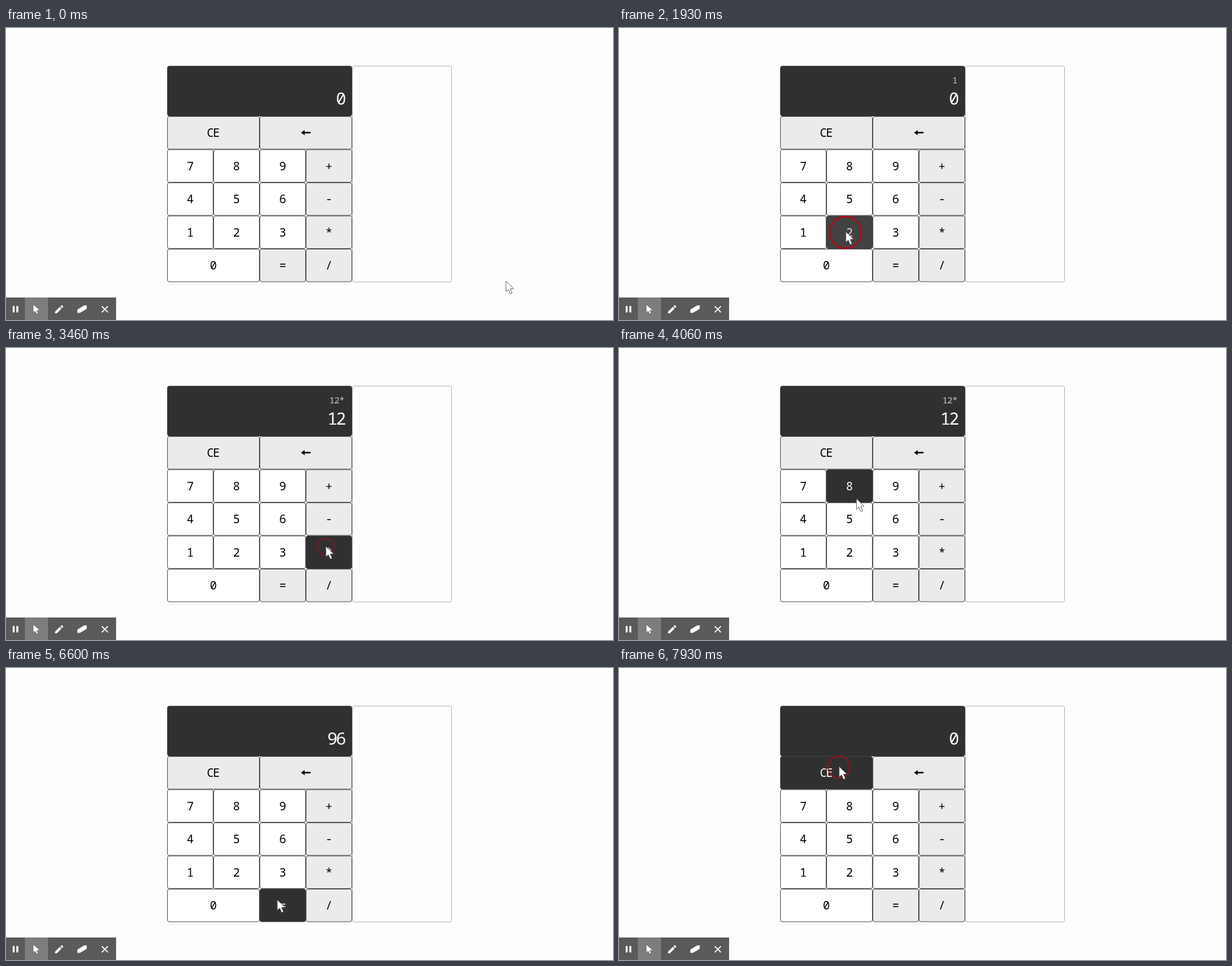
Write an HTML page that moves like this. It is 998 px wide and 480 px high and loops after 8000 ms.

```html
<!DOCTYPE html>
<html lang="en">
<head>
<meta charset="utf-8">
<title>Calculator</title>
<style>
  html, body { margin: 0; width: 100%; height: 100%; overflow: hidden; background: #fdfdfd; }
  svg { display: block; width: 998px; height: 480px; }
  text { font-family: "Noto Sans Mono", "DejaVu Sans Mono", monospace; }
  .key rect { stroke: #2c2c2c; stroke-width: .85; }
  .key text { font-size: 19px; letter-spacing: -1.4px; text-anchor: middle; }
  .out { text-anchor: end; }
  #expr { font-size: 15px; letter-spacing: -.8px; fill: #c6c6c6; }
  #total { font-size: 28px; letter-spacing: -2.6px; fill: #fff; }
</style>
</head>
<body>
<svg viewBox="0 0 998 480">
  <rect width="998" height="480" fill="#fdfdfd"/>
  <rect x="569.5" y="62.5" width="163" height="355" rx="3" fill="#fdfdfd" stroke="#aaa" stroke-width=".9"/>
  <rect x="265" y="62.3" width="304" height="82.8" rx="4" fill="#303030"/>
  <text id="expr" class="out" x="556" y="91"></text>
  <text id="total" class="out" x="556.6" y="126"></text>
  <g id="keys"></g>

  <g id="toolbar">
    <rect y="443" width="181" height="37" fill="#5a5a5a"/>
    <rect x="31" y="443" width="38" height="37" fill="#7d7d7d"/>
    <g fill="#fff">
      <path d="M11 457h3.2v10.5H11zM17 457h3.2v10.5H17z"/>
      <path d="M45.3 455.5V467l2.8-2.3 2.1 4.6 2-.9-2.1-4.5 4.4-.5z"/>
      <path d="M80.7 466.2l8-8 2.9 2.9-8 8h-2.9zM89.6 457.3l1.4-1.4q.7-.6 1.4 0l1.5 1.5q.6.7 0 1.4l-1.4 1.4z"/>
      <path d="M118.2 462.2l10-5.9q4.3-1.2 4.6.5v3.8q0 1-1 1.6l-9.8 5.7q-4.5 1.2-4.8-.6v-3.500q0-1 1-1.600z"/>
    </g>
    <path d="M157.500 457.300l10 10m0-10l-10 10" stroke="#fff" stroke-width="1.700"/>
  </g>

  <circle id="ring" fill="none" stroke="#a80d1c"/>
  <path id="cursor" d="M0 0V17.200L4 13.800 7.200 21 10.200 19.600 7.100 12.700 12.600 12.300Z"
        fill="#fff" stroke="#55555f" stroke-width=".9" stroke-linejoin="round"/>
</svg>
<script>
const LOOP = 8000;
const COL = 76, ROW = 54.5, LEFT = 265, TOP = 145;
const $ = id => document.getElementById(id);

function make(name, attrs, parent) {
  const el = document.createElementNS("http://www.w3.org/2000/svg", name);
  for (const k in attrs) el.setAttribute(k, attrs[k]);
  parent.appendChild(el);
  return el;
}

// Each row lists its labels; a repeated label widens the key.
const rows = [
  ["CE", "CE", "←", "←"],
  ["7", "8", "9", "+"],
  ["4", "5", "6", "-"],
  ["1", "2", "3", "*"],
  ["0", "0", "=", "/"]
];
const keys = [];
rows.forEach((row, r) => row.forEach((label, c) => {
  if (row[c - 1] === label) return;
  const span = row[c + 1] === label ? 2 : 1;
  const x = LEFT + c * COL, y = TOP + r * ROW, w = span * COL;
  const g = make("g", { class: "key" }, $("keys"));
  const box = make("rect", { x: x + .45, y: y + .45, width: w - .9, height: ROW - .9, rx: 3 }, g);
  const cx = x + w / 2, cy = y + ROW / 2;
  let mark;
  if (label === "←") {
    mark = make("path", { d: `M${cx - 8} ${cy - .3}l6-4.200v2.900h9.700v2.600h-9.700v2.900z` }, g);
  } else {
    mark = make("text", { x: cx - .7, y: cy + 6.9 }, g);
    mark.textContent = label;
  }
  const fill = /\d/.test(label) ? "#fff" : "#ebebeb";
  keys.push({ x, y, w, box, mark, fill });
}));

// Cursor stops: time, x, y.
const stops = [
  [0, 822, 416], [130, 822, 416],
  [800, 301, 336], [1180, 301, 336],
  [1800, 373, 335], [2060, 373, 335],
  [2760, 525, 331], [2800, 525, 331],
  [3060, 526, 326], [3480, 526, 326],
  [4249, 382, 243], [4740, 382, 243],
  [5330, 441, 365], [5480, 446, 381],
  [6730, 446, 381], [7560, 362, 162],
  [LOOP, 362, 162]
];
// Mouse down, mouse up, then the texts shown after release.
const clicks = [
  [1000, 1070, "1", "0"],
  [1870, 2005, "12", "0"],
  [3260, 3350, "12*", "12"],
  [4330, 4440, "12*8", "12"],
  [5520, 5620, "", "96"],
  [7730, 7860, "", "0"]
];

const ease = u => u < .5 ? 4 * u ** 3 : 1 - 4 * (1 - u) ** 3;

function cursorAt(t) {
  const i = Math.max(1, stops.findIndex(s => s[0] > t));
  const [t0, x0, y0] = stops[i - 1], [t1, x1, y1] = stops[i];
  const k = ease((t - t0) / (t1 - t0));
  return [x0 + (x1 - x0) * k, y0 + (y1 - y0) * k];
}

function draw(t) {
  const [x, y] = cursorAt(t);
  let expr = "", total = "0", radius = 0, held = false;
  for (const [down, up, e, v] of clicks) {
    if (t < down) break;
    if (t < up) {
      held = true;
      radius = 26 * Math.min(1, (t - down + 15) / 60);
    } else {
      expr = e;
      total = v;
      radius = Math.max(0, 26 - .11 * (t - up));
    }
  }
  $("expr").textContent = expr;
  $("total").textContent = total;

  for (const k of keys) {
    const over = x >= k.x && x < k.x + k.w && y >= k.y && y < k.y + ROW;
    k.box.setAttribute("fill", !over ? k.fill : held ? "#424242" : "#303030");
    k.mark.setAttribute("fill", !over ? "#000" : held ? "#ddd" : "#fff");
  }

  const ring = $("ring");
  ring.setAttribute("cx", x);
  ring.setAttribute("cy", y + 1);
  ring.setAttribute("r", radius);
  ring.setAttribute("stroke-width", .6 + radius * .085);
  ring.setAttribute("opacity", radius ? Math.min(1, .35 + radius / 38) : 0);
  $("cursor").setAttribute("transform", `translate(${x} ${y})`);
}

const start = performance.now();
function tick() {
  draw((performance.now() - start) % LOOP);
  requestAnimationFrame(tick);
}
tick();
</script>
</body>
</html>
```
